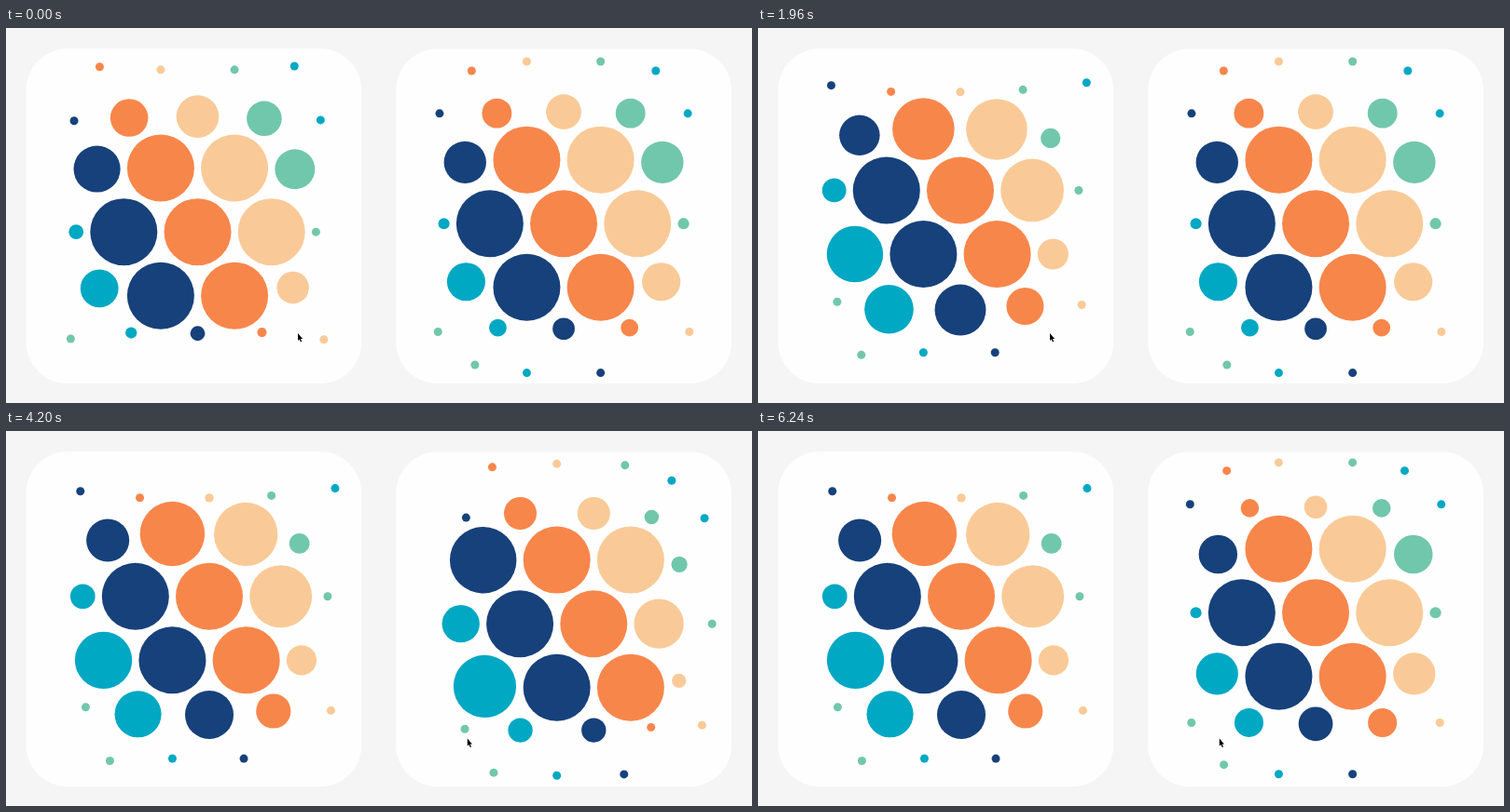
Write an HTML page that moves like this. It is 800 px wide and 403 px high and loops after 6.28 s.

```html
<!DOCTYPE html>
<html lang="en">
<head>
<meta charset="utf-8">
<title>Bubble grids</title>
<style>
  html, body { margin: 0; width: 100%; height: 100%; overflow: hidden; background: #f5f5f6; }
  svg { display: block; width: 100vw; height: 100vh; }
</style>
</head>
<body>
<svg id="stage" viewBox="0 0 800 403">
  <defs>
    <clipPath id="cardClip"><rect x="-180" y="-180" width="360" height="360" rx="45"/></clipPath>
  </defs>
</svg>
<script>
const NS = "http://www.w3.org/2000/svg";
const LOOP = 6280, STEP = 40;
const PALETTE = ["#17417b", "#f7864b", "#f9ca97", "#71c7ab", "#00a8c3"];
const SIZE = 72, MIN = 9, PITCH = 79.2, ROW = PITCH * Math.sqrt(3) / 2;
const EDGE = 90, CORNER = 45, FRINGE = 72;
const PULL_START = FRINGE + SIZE / 2;
const COUNT = 30;
const FLATTEN = 0.7;

// Circular drags of the middle bubble; keys are [time, degrees, radius]
const LEFT_DRAG = {
  x: 207, y: 195,
  keys: [[0, 92.5, 34.5], [1280, 433.6, 32.9], [2200, 705, 30], [2520, 654.1, 27]]
};
const RIGHT_DRAG = {
  x: 602, y: 196,
  keys: [[3000, 101, 20.7], [3120, 136.7, 29.5], [3720, 259, 31.3], [4240, 400, 32],
         [4720, 516.5, 16.4], [5560, 737.9, 36.8], [6240, 915, 4.1]]
};
const POINTER_PATH = [[2560, 313, 328], [2760, 494.8, 330.5]];

function make(tag, attrs, parent) {
  const el = document.createElementNS(NS, tag);
  for (const key in attrs) el.setAttribute(key, attrs[key]);
  parent.appendChild(el);
  return el;
}

// Smooth curve through timed pairs, at rest at both ends
function follow(keys, t) {
  const last = keys.length - 1;
  if (t <= keys[0][0]) return keys[0].slice(1);
  if (t >= keys[last][0]) return keys[last].slice(1);
  let i = 0;
  while (keys[i + 1][0] <= t) i++;
  const a = keys[i], b = keys[i + 1], span = b[0] - a[0], u = (t - a[0]) / span;
  const slope = (k, n) => k === 0 || k === last ? 0
    : (keys[k + 1][n] - keys[k - 1][n]) / (keys[k + 1][0] - keys[k - 1][0]) * span;
  return [1, 2].map(n =>
    a[n] * (1 + 2 * u) * (1 - u) ** 2 + slope(i, n) * u * (1 - u) ** 2 +
    b[n] * u * u * (3 - 2 * u) + slope(i + 1, n) * u * u * (u - 1));
}

function orbit(drag, t) {
  const [degrees, radius] = follow(drag.keys, t);
  const angle = degrees * Math.PI / 180;
  return [
    drag.x + radius * Math.cos(angle),
    drag.y + radius * FLATTEN * Math.sin(angle)
  ];
}

// Shrinks a bubble and draws it inward the farther it lies past the inner square
function squeeze(x, y, gravity) {
  const ax = Math.abs(x), ay = Math.abs(y);
  let nx = 0, ny = 0, dist;
  if (ax > EDGE - CORNER && ay > EDGE - CORNER) {
    const cx = ax - EDGE + CORNER, cy = ay - EDGE + CORNER, len = Math.hypot(cx, cy);
    dist = len - CORNER;
    nx = cx / len;
    ny = cy / len;
  } else {
    dist = Math.max(ax, ay) - EDGE;
    if (ax > ay) nx = 1; else ny = 1;
  }
  const k = Math.min(1, Math.max(0, dist / FRINGE));
  const pull = (SIZE - MIN) / 2 * k + gravity * Math.max(0, dist - PULL_START);
  return {
    x: x - Math.sign(x) * nx * pull,
    y: y - Math.sign(y) * ny * pull,
    r: (SIZE - (SIZE - MIN) * k) / 2
  };
}

function makeCard(cx, cy, drag, gravity) {
  const group = make("g", { transform: `translate(${cx} ${cy})`, "clip-path": "url(#cardClip)" }, stage);
  make("rect", { x: -180, y: -180, width: 360, height: 360, fill: "#fefefe" }, group);
  const bubbles = [];
  for (let row = 0; bubbles.length < COUNT; row++) {
    const cols = row % 2 ? 5 : 4;
    for (let col = 0; col < cols && bubbles.length < COUNT; col++) {
      const hue = (col + 6 - Math.ceil(row / 2)) % 5;
      bubbles.push({
        x: (col - (cols - 1) / 2) * PITCH,
        y: (row - 3) * ROW,
        el: make("circle", { fill: PALETTE[hue] }, group)
      });
    }
  }
  return t => {
    const [px, py] = orbit(drag, t);
    for (const b of bubbles) {
      const s = squeeze(px + b.x - cx, py + b.y - cy, gravity);
      b.el.setAttribute("cx", s.x.toFixed(2));
      b.el.setAttribute("cy", s.y.toFixed(2));
      b.el.setAttribute("r", s.r.toFixed(2));
    }
  };
}

const stage = document.getElementById("stage");
const cards = [
  makeCard(201.4, 202.1, LEFT_DRAG, 0),
  makeCard(598.1, 202.2, RIGHT_DRAG, 0.88)
];
const pointer = make("path", {
  d: "M0 0V8L1.7 6.5L3 9.5L4.2 9L2.9 6.1H5.2Z",
  fill: "#000", stroke: "#fff", "stroke-width": 0.6, "paint-order": "stroke"
}, stage);

function render(t) {
  cards.forEach(draw => draw(t));
  pointer.setAttribute("transform", `translate(${follow(POINTER_PATH, t).join(" ")})`);
}

const start = performance.now();
function tick() {
  const t = (performance.now() - start) % LOOP;
  render(Math.floor(t / STEP) * STEP);
  requestAnimationFrame(tick);
}
tick();
</script>
</body>
</html>
```
